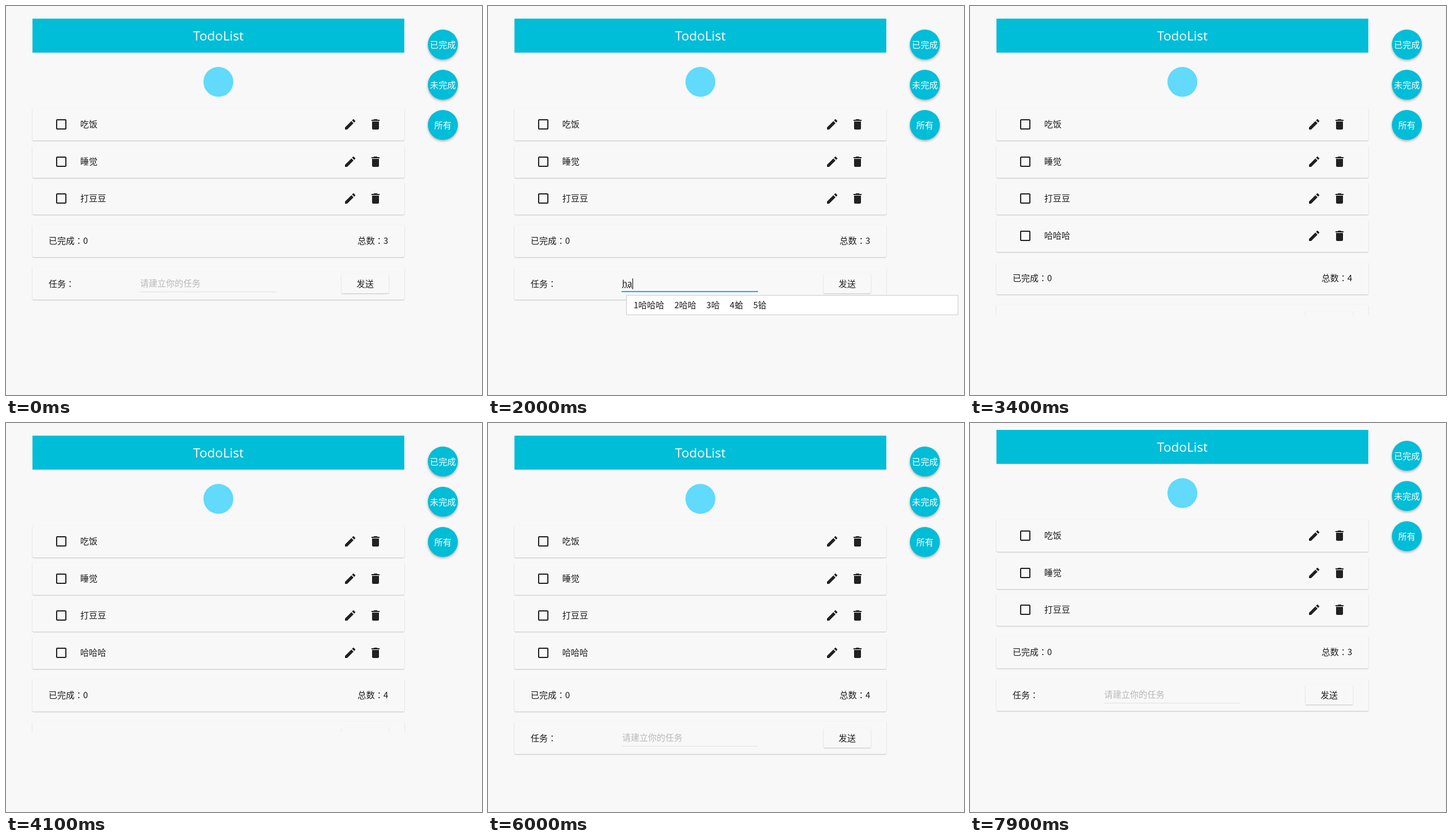
These frames come from a looping animation (827 by 677 pixels, 8000 ms). An HTML page:

```html
<!DOCTYPE html>
<html lang="zh-CN">
<head>
<meta charset="utf-8">
<title>TodoList</title>
<style>
  html, body { margin: 0; width: 827px; height: 677px; overflow: hidden; background: #f8f8f8; }
  body { font: 300 15px/20px "Noto Sans CJK SC", "Noto Sans CJK", sans-serif; color: #1c1c1c; }
  div, svg { position: absolute; white-space: nowrap; box-sizing: border-box; }
  #page { left: 0; top: 0; width: 827px; height: 677px; overflow: hidden; }
  #rows { left: 0; top: 0; }
  header { position: absolute; left: 46px; top: 22px; width: 646px; height: 59px; background: #00bdd8; color: #fff;
    font: 500 22.5px/59px "Open Sans", "Noto Sans", sans-serif; text-align: center; box-shadow: 0 1px 1px rgba(0,0,0,.1); }
  #logo { left: 343px; top: 106px; width: 52px; height: 52px; border-radius: 50%; background: #61dafb; }
  .card { left: 46px; width: 646px; height: 56px; border-radius: 2px; box-shadow: 0 1px 2px rgba(0,0,0,.22); }
  .card > div { top: 17px; }
  .card svg { top: 16px; width: 24px; height: 24px; fill: #212121; }
  .fab { left: 733px; width: 52px; height: 52px; border-radius: 50%; background: #00bdd8; color: #fff;
    font-weight: 400; line-height: 51px; text-align: center; box-shadow: 0 2px 4px rgba(0,0,0,.32); }
  .left { left: 28px; }
  .right { right: 28px; }
  #form #send { left: 537px; top: 11px; width: 82px; height: 34px; line-height: 34px; text-align: center;
    border-radius: 2px; box-shadow: 0 1px 2px rgba(0,0,0,.22); }
  #form #hint { left: 187px; top: 17px; color: #b8b8b8; }
  #form #value { left: 187px; top: 18px; }
  #caret { display: inline-block; width: 1px; height: 19px; background: #000; vertical-align: -4px; }
  #form #line { left: 186px; top: 42px; width: 237px; height: 1px; background: #e0e0e0; }
  #form #focus { left: 186px; top: 41px; width: 237px; height: 2px; background: #00bdd8; }
  #mode { left: 233px; top: 496px; width: 31px; height: 31px; border: 2px solid #111; background: #fafafa;
    font-weight: 700; line-height: 26px; text-align: center; }
  #choices { left: 240px; top: 503px; width: 577px; height: 35px; border: 1px solid #ccc; background: #fff;
    line-height: 32px; padding-left: 12px; word-spacing: 14px; }
</style>
</head>
<body>
<div id="page">
  <header>TodoList</header>
  <div id="logo"></div>
  <div id="rows"></div>
  <div id="summary" class="card">
    <div class="left">已完成<span class="colon">：</span>0</div>
    <div class="right">总数<span class="colon">：</span><span id="total"></span></div>
  </div>
  <div id="form" class="card">
    <div class="left" style="top:18px">任务<span class="colon">：</span></div>
    <div id="hint">请建立你的任务</div>
    <div id="value"><span id="typed"></span><span id="caret"></span></div>
    <div id="line"></div>
    <div id="focus"></div>
    <div id="send">发送</div>
  </div>
  <div id="mode">中</div>
  <div id="choices">1哈哈哈 2哈哈 3哈 4蛤 5铪</div>
</div>
<script>
const $ = id => document.getElementById(id);
const show = (id, on) => $(id).style.visibility = on ? 'visible' : 'hidden';
const ROW = 64.5;
const LOOP = 8000, FOCUS = 1000, TYPE = 1900, COMMIT = 2400, ADD = 3100, REVEAL = 5000, RESET = 7600;

const icon = (x, d) => `<svg style="left:${x}px" viewBox="0 0 24 24"><path d="${d}"/></svg>`;
const icons =
  icon(38, 'M19 5v14H5V5h14m0-2H5c-1.1 0-2 .9-2 2v14c0 1.1.9 2 2 2h14c1.1 0 2-.9 2-2V5c0-1.1-.9-2-2-2z') +
  icon(540, 'M3 17.25V21h3.75L17.81 9.94l-3.75-3.75L3 17.25zM20.71 7.04c.39-.39.39-1.02 0-1.41l-2.34-2.34c-.39-.39-1.02-.39-1.41 0l-1.83 1.83 3.75 3.75 1.83-1.83z') +
  icon(584, 'M6 19c0 1.1.9 2 2 2h8c1.1 0 2-.9 2-2V7H6v12zM19 4h-3.5l-1-1h-5l-1 1H5v2h14V4z');

$('rows').innerHTML = ['吃饭', '睡觉', '打豆豆', '哈哈哈'].map((text, i) =>
  `<div class="card" style="top:${178 + i * ROW}px">${icons}<div style="left:83px">${text}</div></div>`).join('');
['已完成', '未完成', '所有'].forEach((text, i) =>
  $('page').insertAdjacentHTML('beforeend', `<div class="fab" style="top:${40.5 + 70 * i}px">${text}</div>`));

// Japanese glyph variant keeps the wide colon centred
document.querySelectorAll('.colon').forEach(el => {
  el.lang = 'ja';
  el.style.fontFamily = '"Noto Sans CJK JP", "Noto Sans CJK", sans-serif';
});

function draw(t) {
  const added = t >= ADD && t < RESET;
  const focused = t >= FOCUS && t < ADD;
  const composing = t >= TYPE && t < COMMIT;
  const shift = added ? ROW : 0;

  $('page').style.top = t >= RESET ? '-10px' : '0';
  $('page').style.clipPath = t >= ADD && t < REVEAL ? 'inset(0 0 139px 0)' : 'none';
  $('rows').lastChild.style.display = added ? 'block' : 'none';
  $('total').textContent = added ? 4 : 3;
  $('summary').style.top = 381 + shift + 'px';
  $('form').style.top = 455 + shift + 'px';

  let typed = '';
  if (composing) typed = 'hahaha'.slice(0, 1 + Math.floor((t - TYPE) / 80));
  else if (t >= COMMIT && t < ADD) typed = '哈哈哈';
  $('typed').textContent = typed;
  $('typed').style.textDecoration = composing ? 'underline dotted' : 'none';

  const blinkStart = t < TYPE ? FOCUS : COMMIT;
  show('hint', !typed);
  show('caret', focused && (composing || (t - blinkStart) % 1060 < 530));
  show('mode', t >= FOCUS + 100 && t < TYPE);
  show('choices', composing);
  show('focus', focused);
  const grow = Math.min(1, Math.max(0, (t - FOCUS) / 300));
  $('focus').style.transform = `scaleX(${1 - (1 - grow) ** 4})`;
}

function tick() {
  draw(performance.now() % LOOP);
  requestAnimationFrame(tick);
}
tick();
</script>
</body>
</html>
```
